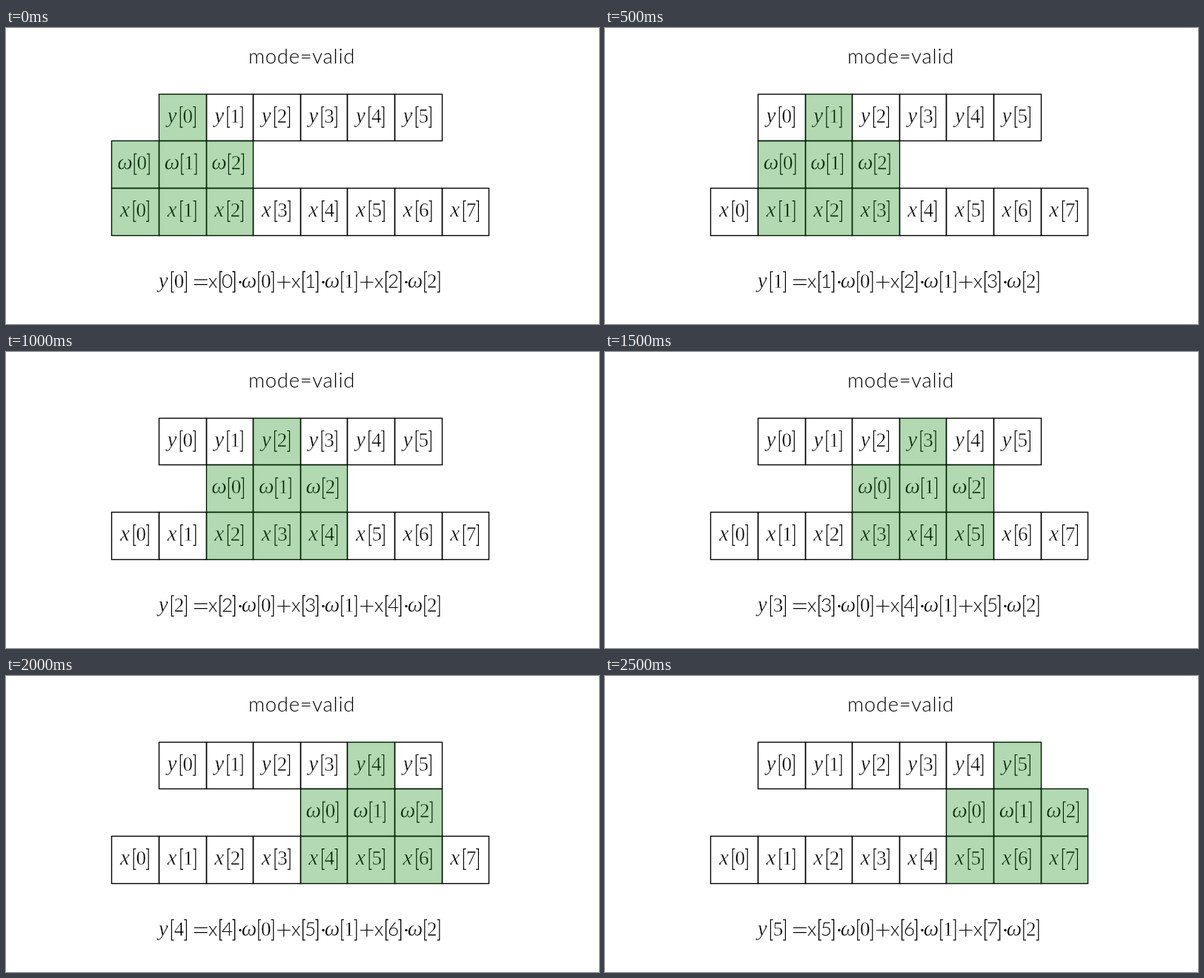
Recreate the animation shown at these times as an HTML page. Size 800 px wide and 400 px high, loop 3000 ms.

```html
<!DOCTYPE html>
<html lang="en">
<head>
<meta charset="utf-8">
<title>Valid convolution</title>
<style>
html, body { margin: 0; width: 100%; height: 100%; overflow: hidden; background: #fff; }
svg { display: block; width: 800px; height: 400px; }
/* The white outline thins the glyphs. */
text { text-anchor: middle; font: 27px "Liberation Serif", serif; stroke: #fff; stroke-width: .45; }
.var { font-size: 29px; font-style: italic; }
.sans, .title { font: 300 26px Lato, sans-serif; stroke: none; }
.title { font-size: 27.5px; letter-spacing: .7px; }
path, .cell { fill: none; stroke: #000; stroke-width: 1.4; }
.thin { stroke-width: 1.2; }
.lit { fill: rgb(0 128 0 / .3); }
.step { animation: show 3s step-end infinite; }
@keyframes show {
  0% { visibility: visible; }
  16.6666%, 100% { visibility: hidden; }
}
</style>
</head>
<body>
<svg viewBox="0 0 800 400">
  <text class="title" x="399" y="48">mode=valid</text>
</svg>
<script>
const SIZE = 63.6, LEFT = 142.4, TOP = 88.8, BASE = 350.5, STEPS = 6;
const WIDTH = { y: 15, x: 16, ω: 18 };
const svg = document.querySelector("svg");

function add(parent, tag, attrs, content = "") {
  const el = document.createElementNS("http://www.w3.org/2000/svg", tag);
  for (const key in attrs) el.setAttribute(key, attrs[key]);
  el.textContent = content;
  return parent.appendChild(el);
}

const glyph = (parent, x, y, char, cls = "") => add(parent, "text", { x, y, class: cls }, char);
const stroke = (parent, d, cls = "thin") => add(parent, "path", { d, class: cls });

// Grid lines sit on pixel centres.
const snap = v => Math.round(v) + 0.5;
const gridX = col => snap(LEFT + col * SIZE);
const gridY = row => snap(TOP + row * SIZE);

// Opening bracket at x, closing bracket 20.4 further on.
function brackets(parent, x, y, cls) {
  const top = y - 21.2, h = 27.6;
  stroke(parent, `M${x + 7} ${top}h-3.2v${h}h3.2M${x + 20.6} ${top}h3.2v${h}h-3.2`, cls);
}

function indexed(parent, name, index, x, y) {
  const w = WIDTH[name];
  glyph(parent, x + w / 2, y, name, "var");
  brackets(parent, x + w, y);
  glyph(parent, x + w + 13.8, y, index);
}

function box(parent, col, row, cls) {
  const x = gridX(col), y = gridY(row);
  add(parent, "rect", { x, y, width: gridX(col + 1) - x, height: gridY(row + 1) - y, class: cls });
}

function cells(parent, name, count, col, row) {
  for (let i = 0; i < count; i++) {
    const x = LEFT + (col + i + 0.5) * SIZE - (WIDTH[name] + 27.6) / 2;
    box(parent, col + i, row, "cell");
    indexed(parent, name, i, x, TOP + row * SIZE + 38.9);
  }
}

function formula(parent, n) {
  indexed(parent, "y", n, 204.6, BASE);
  stroke(parent, `M253.9 ${BASE - 10.4}h17.8m0 6.6h-17.8`);
  for (let k = 0; k < 3; k++) {
    const x = 273 + 112 * k;
    glyph(parent, x + 6.2, BASE, "x", "sans");
    brackets(parent, x + 11.8, BASE, "bold");
    glyph(parent, x + 25.6, BASE, n + k, "sans");
    add(parent, "circle", { cx: x + 43, cy: BASE - 7, r: 1.7 });
    indexed(parent, "ω", k, x + 46, BASE);
    if (k < 2) stroke(parent, `M${x + 93} ${BASE - 7}h17.6m-8.8 -8.8v17.6`);
  }
}

cells(svg, "y", 6, 1, 0);
cells(svg, "x", 8, 0, 2);

for (let n = 0; n < STEPS; n++) {
  const step = add(svg, "g", { class: "step", style: `animation-delay: ${n / 2 - 3}s` });
  cells(step, "ω", 3, n, 1);
  box(step, n + 1, 0, "lit");
  for (let i = 0; i < 3; i++) {
    box(step, n + i, 1, "lit");
    box(step, n + i, 2, "lit");
  }
  formula(step, n);
}
</script>
</body>
</html>
```
